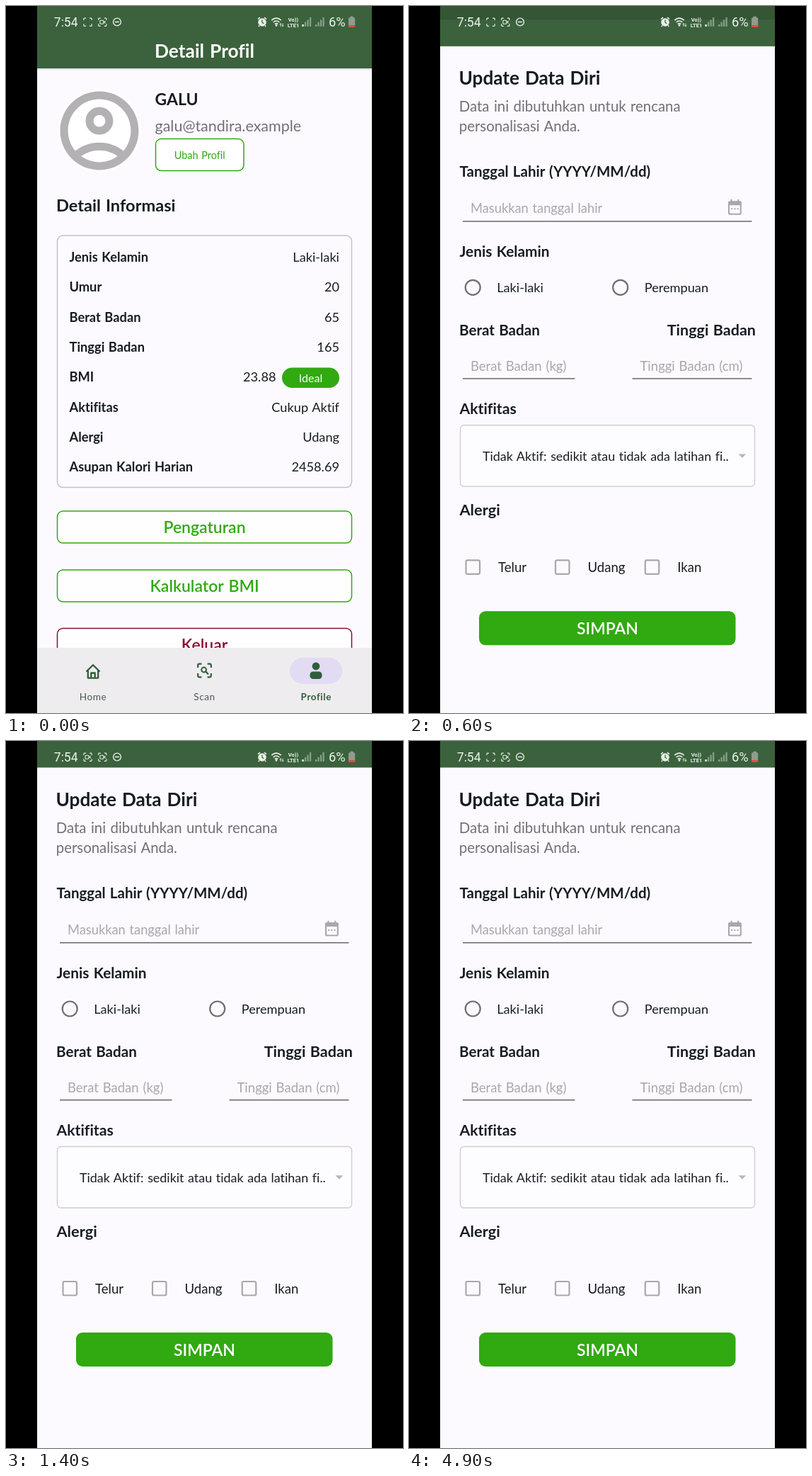
Animation, 561 px wide and 998 px high, one loop 5000 ms. Source, as an HTML page:

```html
<!DOCTYPE html>
<html lang="id">
<head>
<meta charset="utf-8">
<title>Detail Profil</title>
<style>
html, body { margin: 0; width: 100%; height: 100%; overflow: hidden; background: #000; }
svg { display: block; width: 561px; height: 998px; }
text { font-family: Lato, "Open Sans", sans-serif; font-variant-ligatures: none; word-spacing: .06em; fill: #171c22; white-space: pre; }
.sys { font-family: Roboto, sans-serif; word-spacing: 0; fill: #eef3ee; }
</style>
</head>
<body>
<svg viewBox="0 0 561 998" xmlns="http://www.w3.org/2000/svg">
  <defs>
    <clipPath id="screen"><rect x="44" width="473" height="998"/></clipPath>
    <linearGradient id="shade" x2="0" y2="1">
      <stop offset="0" stop-color="#000" stop-opacity=".16"/>
      <stop offset="1" stop-color="#000" stop-opacity="0"/>
    </linearGradient>
  </defs>
  <rect width="561" height="998" fill="#000"/>
  <g clip-path="url(#screen)">
    <g id="profile"></g>
    <rect id="dim" x="44" width="473" height="998" opacity="0"/>
    <g id="form"></g>
    <g id="status"></g>
  </g>
</svg>
<script>
const LOOP = 5000, STEP = 100;
const GREEN = '#31a911', HEAD = '#3b623c', PAGE = '#fcfaff', GREY = '#727077', HINT = '#a9a7ab';
const $ = id => document.getElementById(id);

const text = (x, y, size, str, o = {}) =>
  `<text x="${x}" y="${y}" font-size="${size}" font-weight="${o.w || 400}" text-anchor="${o.a || 'start'}"` +
  `${o.c ? ` style="fill:${o.c}"` : ''}${o.ls ? ` letter-spacing="${o.ls}"` : ''}${o.cls ? ` class="${o.cls}"` : ''}>${str}</text>`;
const bold = (x, y, size, str, o = {}) => text(x, y, size, str, { w: 700, ...o });
const rect = (x, y, w, h, r, fill, stroke = 'none', sw = 1.5) =>
  `<rect x="${x}" y="${y}" width="${w}" height="${h}" rx="${r}" fill="${fill}" stroke="${stroke}" stroke-width="${sw}"/>`;
const line = (d, c, sw, extra = '') => `<path d="${d}" fill="none" stroke="${c}" stroke-width="${sw}" ${extra}/>`;
const fill = (d, c, extra = '') => `<path d="${d}" fill="${c}" ${extra}/>`;
const dot = (x, y, r, c) => `<circle cx="${x}" cy="${y}" r="${r}" fill="${c}"/>`;
const ring = (x, y, r, c, sw) => `<circle cx="${x}" cy="${y}" r="${r}" fill="none" stroke="${c}" stroke-width="${sw}"/>`;

// Four corner brackets around a centre
function corners(x, y, r, arm, c, sw, round) {
  return [[-1, -1], [1, -1], [1, 1], [-1, 1]].map(([i, j]) => {
    const X = x + i * r, Y = y + j * r;
    return line(`M${X - i * arm} ${Y}H${X - i * round}Q${X} ${Y} ${X} ${Y - j * round}V${Y - j * arm}`, c, sw);
  }).join('');
}

function avatar() {
  const icon = 'M12 2C6.48 2 2 6.48 2 12s4.48 10 10 10 10-4.48 10-10S17.52 2 12 2z' +
    'M7.35 18.5C8.66 17.56 10.26 17 12 17s3.34.56 4.65 1.5C15.34 19.44 13.74 20 12 20s-3.34-.56-4.65-1.5z' +
    'm10.79-1.38C16.45 15.8 14.32 15 12 15s-4.45.8-6.14 2.12C4.7 15.73 4 13.95 4 12c0-4.42 3.58-8 8-8s8 3.58 8 8c0 1.95-.7 3.73-1.86 5.12z' +
    'M12 6c-1.93 0-3.5 1.57-3.5 3.5S10.07 13 12 13s3.5-1.57 3.5-3.5S13.93 6 12 6z' +
    'm0 5c-.83 0-1.5-.67-1.5-1.5S11.17 8 12 8s1.5.67 1.5 1.5S12.83 11 12 11z';
  return dot(132, 176, 58.5, '#fff') +
    fill(icon, '#b3b1b3', 'fill-rule="evenodd" transform="translate(65.4 109.4) scale(5.55)"');
}

function navBar() {
  const c = '#2f5d39';
  return rect(44, 906, 473, 150, 0, '#eeecef') +
    line('M113.5 939.5L123 930.2L132.5 939.5M115.8 938V948.6H130.2V938M120.3 948V941.5H125.7V948', c, 2.3, 'stroke-linejoin="round"') +
    corners(280.5, 938, 9.3, 5.2, c, 2.2, 2) + ring(279.6, 937, 3.4, c, 2) + line('M282 939.4L286 943.4', c, 2.2) +
    rect(401, 920, 74, 37, 18.5, '#e3daf4') +
    dot(438, 932, 5.4, c) + rect(429.5, 939.5, 17, 10.5, 4.5, c) +
    text(123, 979.5, 13.6, 'Home', { a: 'middle', c: '#4c5a4e', ls: .6 }) +
    text(280.5, 979.5, 13.6, 'Scan', { a: 'middle', c: '#4c5a4e', ls: .6 }) +
    bold(438.3, 979.5, 13.4, 'Profile', { a: 'middle', c, ls: .6 });
}

function profilePage() {
  const rows = [
    ['Jenis Kelamin', 'Laki-laki'], ['Umur', '20'], ['Berat Badan', '65'], ['Tinggi Badan', '165'],
    ['BMI', ''], ['Aktifitas', 'Cukup Aktif'], ['Alergi', 'Udang'], ['Asupan Kalori Harian', '2458.69']
  ];
  const buttons = [['Pengaturan', 713, GREEN], ['Kalkulator BMI', 796, GREEN], ['Keluar', 878.5, '#8a0a32']];
  return rect(44, 0, 473, 1060, 0, PAGE) +
    rect(44, 0, 473, 88, 0, HEAD) + rect(44, 88, 473, 3, 0, 'url(#shade)') +
    bold(280.5, 72.5, 26.3, 'Detail Profil', { a: 'middle', c: '#fff' }) +
    avatar() +
    bold(210.5, 140, 23, 'GALU') +
    text(210.5, 177, 21.5, 'galu@tandira.example', { c: GREY }) +
    rect(211.5, 187.5, 124.5, 45, 8, '#fff', GREEN) +
    text(273.7, 215.5, 14.5, 'Ubah Profil', { a: 'middle', c: GREEN }) +
    bold(71, 290, 23.6, 'Detail Informasi') +
    rect(72.5, 324, 416, 355.5, 8, PAGE, '#c4c2c8') +
    rows.map(([k, v], i) => {
      const y = 361 + i * 42.3;
      return bold(89.5, y, 18.3, k) + text(471, y, 18.2, v, { a: 'end' });
    }).join('') +
    text(381.5, 530, 18.2, '23.88', { a: 'end' }) +
    rect(390, 510.5, 81, 28.5, 14.25, GREEN) +
    text(430.5, 531, 16, 'Ideal', { a: 'middle', c: '#fff' }) +
    buttons.map(([s, y, c]) =>
      rect(72.5, y, 416, 45, 8, '#fffeff', c) + text(280.5, y + 31, 23, s, { w: 600, a: 'middle', c })).join('') +
    navBar();
}

function formPage() {
  const hint = { c: HINT }, rule = '#69676c';
  const radio = (x, s) => ring(x, 378, 10.5, '#6f6d72', 2.2) + text(x + 34, 385, 18.2, s);
  const check = (x, s) => rect(x, 763, 19.5, 19.5, 2, 'none', HINT, 2.2) + text(x + 45.5, 780, 18.6, s);
  return rect(44, 37, 473, 1020, 0, PAGE) + rect(44, 0, 473, 37.5, 0, HEAD) +
    bold(70.5, 92, 26.2, 'Update Data Diri') +
    text(70.8, 130, 20.4, 'Data ini dibutuhkan untuk rencana', { c: GREY }) +
    text(70.8, 158, 20.4, 'personalisasi Anda.', { c: GREY }) +
    bold(71.5, 222, 20.5, 'Tanggal Lahir (YYYY/MM/dd)') +
    text(87, 273, 18.3, 'Masukkan tanggal lahir', hint) +
    line('M76 284.7H484.5M76 506.7H234.5M315.5 506.7H484.5', rule, 1.4) +
    rect(452, 257, 16.8, 17.5, 1.5, 'none', HINT, 2.1) + rect(451.5, 256.5, 18, 5.5, 1, HINT) +
    line('M455.5 253.8V258M465.3 253.8V258', HINT, 2.1) +
    [456.2, 460.4, 464.6].map(x => rect(x - 1, 266, 2, 2, 0, HINT)).join('') +
    bold(71.5, 335, 20.8, 'Jenis Kelamin') +
    radio(90.2, 'Laki-laki') + radio(298.7, 'Perempuan') +
    bold(71, 446, 20.6, 'Berat Badan') +
    bold(490, 446, 21.5, 'Tinggi Badan', { a: 'end' }) +
    text(87, 496, 18.5, 'Berat Badan (kg)', hint) +
    text(326.5, 496, 18.5, 'Tinggi Badan (cm)', hint) +
    bold(71.5, 557, 21.2, 'Aktifitas') +
    rect(72.5, 572.5, 416, 86.5, 5, '#fdfcff', '#d0cdd4', 1.4) +
    text(104, 623, 17.9, 'Tidak Aktif: sedikit atau tidak ada latihan fi..') +
    fill('M465.5 613.3H476.3L470.9 618.8Z', '#b9b7bc') +
    bold(71.5, 700, 21.8, 'Alergi') +
    check(80.5, 'Telur') + check(207, 'Udang') + check(333.8, 'Ikan') +
    rect(99, 835, 362.5, 48, 9, GREEN) +
    text(280.5, 868, 23, 'SIMPAN', { w: 600, a: 'middle', c: '#fff' });
}

function statusBar() {
  const c = '#e9efe9';
  const cam = x => rect(x - 3.4, 20.2, 4.8, 5, 1, 'none', c, 1.1) + fill(`M${x + 2} 22.3L${x + 4} 20.6V25L${x + 2} 23.3Z`, c);
  const bars = x => [0, 1, 2, 3].map(i =>
    rect(x + i * 3.5, 26 - i * 3.3, 2.2, 3 + i * 3.3, .4, c)).join('');
  return text(67.8, 28.5, 17.5, '7:54', { cls: 'sys' }) +
    corners(115.5, 22.7, 5.6, 3, c, 1.2, 1) + `<g id="blink">${cam(115.5)}</g>` +
    corners(136.3, 22.7, 5.6, 3, c, 1.2, 1) + cam(136.3) +
    ring(157, 22.5, 5.4, c, 1.4) + line('M154 22.5H160', c, 1.5) +
    dot(362, 23, 5.8, c) + line('M362 19.6V23.2L364.4 24.8', HEAD, 1.3) +
    line('M356 18.6L359 16.2M368 18.6L365 16.2M358 27.5L356.8 29M366 27.5L367.2 29', c, 1.6) +
    line('M375.2 20.2Q382 14 388.8 20.2M377.6 23Q382 19 386.4 23M379.8 25.6Q382 23.6 384.2 25.6', c, 1.6) +
    dot(382, 27.4, 1.4, c) +
    line('M388 29V24.8M386.8 26.2L388 24.6L389.2 26.2M391 24.6V28.8M389.8 27.4L391 29L392.2 27.4', c, .9) +
    text(406, 21.5, 7.6, 'Vo))', { cls: 'sys', a: 'middle', w: 700 }) +
    text(406, 29.8, 7.6, 'LTE1', { cls: 'sys', a: 'middle', w: 700 }) +
    `<g opacity=".45">${bars(418.5)}${bars(437)}</g>` + rect(418.5, 26, 2.2, 3, .4, c) +
    text(456, 28.5, 18.3, '6%', { cls: 'sys' }) +
    rect(486.6, 14.8, 4, 2, .5, '#9aa89a') + rect(484, 16.2, 9.2, 13.8, 1.5, '#8f9c8f') +
    rect(484, 27, 9.2, 3, 1, '#e8483f');
}

// Linear interpolation through [time, value] pairs
function track(keys, t) {
  if (t <= keys[0][0]) return keys[0][1];
  for (let i = 1; i < keys.length; i++) {
    const [t0, a] = keys[i - 1], [t1, b] = keys[i];
    if (t <= t1) return a + (b - a) * (t - t0) / (t1 - t0);
  }
  return keys[keys.length - 1][1];
}

const formY = [[300, 98], [400, 94], [500, 58.5], [600, 19.3], [700, 5], [800, .4], [900, 0]];
const formAlpha = [[300, 0], [400, .5], [500, 1]];
const profileY = [[300, 0], [400, -4], [500, -21], [600, -30]];
const dimAlpha = [[400, 0], [500, .04], [600, .12]];

function draw(ms) {
  const t = Math.floor(ms % LOOP / STEP) * STEP;
  $('profile').setAttribute('transform', `translate(0 ${track(profileY, t)})`);
  $('dim').setAttribute('opacity', track(dimAlpha, t));
  $('form').setAttribute('transform', `translate(0 ${track(formY, t)})`);
  $('form').setAttribute('opacity', track(formAlpha, t));
  // The recording icon is lit for the first half of each second, from 100 ms on
  const lit = (t + 900) % 1000 < 500;
  $('blink').setAttribute('opacity', lit ? 1 : 0);
}

$('profile').innerHTML = profilePage();
$('form').innerHTML = formPage();
$('status').innerHTML = statusBar();

const start = performance.now();
function tick() {
  draw(performance.now() - start);
  requestAnimationFrame(tick);
}
tick();
</script>
</body>
</html>
```
